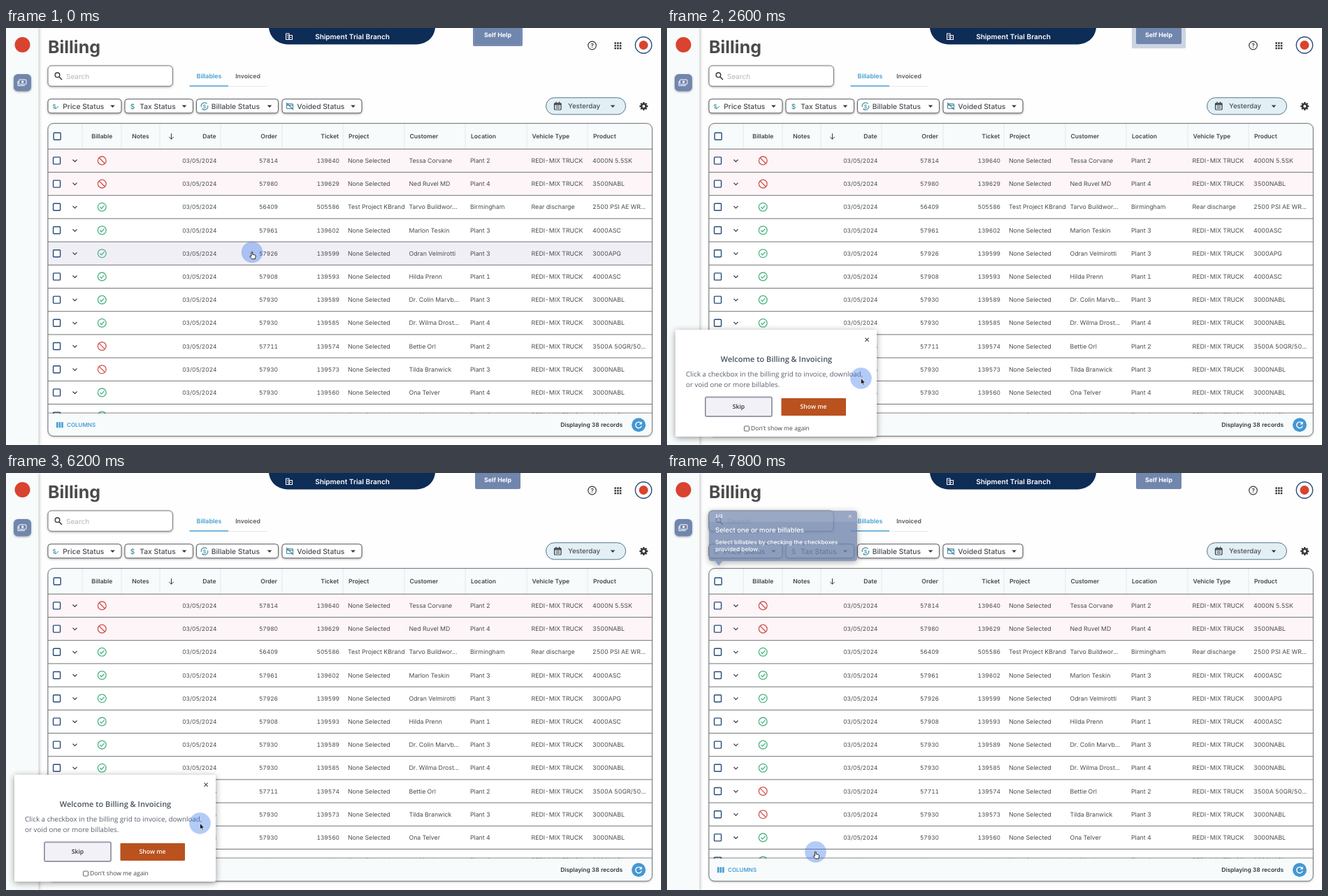
An HTML page for the animation above (8000 ms loop, 937x597 px).

```html
<!DOCTYPE html>
<html lang="en">
<head>
<meta charset="utf-8">
<title>Billing</title>
<style>
  html, body { margin: 0; width: 100%; height: 100%; overflow: hidden; background: #fefefe; }
  svg { display: block; }
  text { font-family: Inter, sans-serif; font-variant-numeric: tabular-nums; text-rendering: geometricPrecision; white-space: pre; }
  .dialog text { font-family: "Open Sans", sans-serif; }
  .shadow { filter: drop-shadow(0 1px 1.5px #0005); }
  .deep { filter: drop-shadow(0 2px 5px #0006); }
</style>
</head>
<body>
<script>
const INK = '#34383d', NAVY = '#274a78', BLUE = '#459fd3', SLATE = '#7186ad', RED = '#d9432f', RULE = '#717478';

const text = (x, y, size, str, fill = INK, weight = 400, anchor = 'start') =>
  `<text x="${x}" y="${y + size * .36}" font-size="${size}" fill="${fill}" font-weight="${weight}" text-anchor="${anchor}">${str}</text>`;
const rect = (x, y, w, h, fill, r = 0, extra = '') =>
  `<rect x="${x}" y="${y}" width="${w}" height="${h}" rx="${r}" fill="${fill}" ${extra}/>`;
const circle = (x, y, r, fill, extra = '') => `<circle cx="${x}" cy="${y}" r="${r}" fill="${fill}" ${extra}/>`;
const line = (d, stroke = INK, width = 1.2, extra = '') =>
  `<path d="${d}" fill="none" stroke="${stroke}" stroke-width="${width}" ${extra}/>`;
const fill = (d, color, extra = '') => `<path d="${d}" fill="${color}" ${extra}/>`;
const group = (content, attrs) => `<g ${attrs}>${content}</g>`;
const caret = (x, y) => fill(`M${x - 3.3} ${y - 1.6}h6.6l-3.3 3.5z`, INK);
const checkbox = (x, y) => rect(x - 5, y - 5, 10, 10, '#fff', 1, `stroke="${NAVY}" stroke-width="1.4"`);

// Side bar and top bar
function chrome() {
  let dots = '';
  for (let i = 0; i < 9; i++) dots += rect(870.4 + i % 3 * 3.7, 20.4 + (i / 3 | 0) * 3.7, 2.5, 2.5, INK);
  return rect(0, 0, 46.5, 597, '#f8fbfc', 0, 'style="filter:drop-shadow(1px 0 2px #0004)"') +
    circle(23.5, 24, 11, RED) +
    rect(11, 66, 25, 24.5, SLATE, 6, 'class="shadow"') +
    rect(18.5, 74, 10.5, 6.5, 'none', 1, 'stroke="#fff"') + circle(23.7, 77.2, 1.6, '#fff') +
    line('M17 76v6.5h10', '#fff', 1) +
    text(60, 27, 25, 'Billing', '#4b4b4d', 700) +
    fill('M376 0C378 15 389 23.6 406 23.6H584C601 23.6 612 15 614 0Z', '#0d2c56') +
    rect(400.5, 8, 4.5, 8.5, 'none', 0, 'stroke="#fff"') + rect(405, 10.5, 4.5, 6, 'none', 0, 'stroke="#fff"') +
    line('M402 10.5h1.5M402 13h1.5M406.5 13.5h1.5', '#fff', 1) +
    text(495.5, 12, 10, 'Shipment Trial Branch', '#fff', 600, 'middle') +
    rect(671, -5, 65, 28, SLATE, 2, 'id="pulse"') +
    rect(671, -5, 65, 28, SLATE, 2) +
    text(703.5, 10.3, 8.8, 'Self Help', '#fff', 700, 'middle') +
    circle(838.5, 25, 5.8, 'none', `stroke="${INK}" stroke-width="1.2"`) +
    text(838.5, 25, 8.5, '?', INK, 600, 'middle') + dots +
    circle(912, 24.5, 11.7, '#fff', `stroke="${NAVY}" stroke-width="1.4"`) + circle(912, 24.5, 6.5, RED);
}

function filterBox(x, w, label, icon) {
  return rect(x, 101.8, w, 20, '#fff', 4, 'stroke="#5c5f64" class="shadow"') + icon +
    text(x + 21.3, 112, 10.25, label, '#484b50', 500) + caret(x + w - 12.5, 112);
}

function toolbar() {
  const dollar = (x, size) => text(x, 112, size, '$', '#3d8f9e', 500, 'middle');
  const cog = line('M912.3 106v12M906.3 112h12M908.1 107.8l8.4 8.4M916.5 107.8l-8.4 8.4', INK, 2.3);
  return rect(60, 54, 178.3, 29.3, '#fff', 5, 'stroke="#77797d" class="shadow"') +
    circle(73.5, 67.3, 3.3, 'none', `stroke="${INK}" stroke-width="1.4"`) + line('M76 70l4 4', INK, 1.6) +
    text(86, 69, 10, 'Search', '#b4b6b9') +
    text(290.5, 69, 8.9, 'Billables', BLUE, 600, 'middle') +
    text(346, 69, 8.7, 'Invoiced', '#55585d', 600, 'middle') +
    line('M318 83.5H374', '#e6e8ea', 1) + line('M262.5 83H318', BLUE, 1.4) +
    filterBox(60, 105, 'Price Status', dollar(69, 8) + line('M69 114l2 2 4-4', '#3d8f9e', 1)) +
    filterBox(170, 97.5, 'Tax Status', dollar(181, 10)) +
    filterBox(272.5, 117, 'Billable Status', dollar(284, 7) +
      line('M279.5 113a4.7 4.7 0 0 1 8-4.5M288.5 111a4.7 4.7 0 0 1-8 4.5', '#3d8f9e', 1.2)) +
    filterBox(395, 114, 'Voided Status', rect(401.5, 108.5, 9, 7, 'none', 1, 'stroke="#3d8f9e" stroke-width="1.2"') +
      line('M401 107l10 10M402 110.5h9', '#3d7f9e', 1.1)) +
    rect(772.5, 99.8, 114, 24, '#e2f0f6', 12, 'stroke="#547489"') +
    rect(784.5, 107.5, 9.5, 9.5, 'none', 1, `stroke="${INK}" stroke-width="1.2"`) +
    line('M784 109.3h10', INK, 2) + line('M787 105.5v2M791.5 105.5v2M786.5 112h5.5M786.5 114.5h5.5', INK, 1) +
    text(804, 112, 9.7, 'Yesterday', '#4a5056', 500) + caret(868, 112) +
    cog + circle(912.3, 112, 4.5, INK) + circle(912.3, 112, 1.9, '#fff');
}

// status | order | ticket | project | customer | location | vehicle | product
const ROWS = `n|57814|139640||Tessa Corvane|Plant 2||4000N 5.5SK
n|57980|139629||Ned Ruvel MD|Plant 4||3500NABL
y|56409|505586|Test Project KBrandel|Tarvo Buildwor...|Birmingham|Rear discharge|2500 PSI AE WR...
y|57961|139602||Marlon Teskin|Plant 3||4000ASC
y|57926|139599||Odran Velmirotti|Plant 3||3000APG
y|57908|139593||Hilda Prenn|Plant 1||4000ASC
y|57930|139589||Dr. Colin Marvb...|Plant 3||3000NABL
y|57930|139585||Dr. Wilma Drost...|Plant 4||3000NABL
n|57711|139574||Bettie Orl|Plant 2||3500A 50GR/50...
n|57930|139573||Tilda Branwick|Plant 3||3000NABL
y|57930|139560||Ona Telver|Plant 4||3000NABL
y|57930|139558||Ivo Marden|Plant 4||3000NABL`.split('\n').map(row => row.split('|'));
const TOP = 173.3, PITCH = 33.2;

function statusIcon(ok, y) {
  const color = ok ? '#4cb482' : '#d05552';
  return circle(137.3, y, 5.9, 'none', `stroke="${color}" stroke-width="1.3"`) +
    line(ok ? `M134.4 ${y}l2.1 2.2 4-4.2` : `M133.2 ${y - 4.1}l8.2 8.2`, color, 1.3);
}

function tableRow([status, order, ticket, project, customer, place, vehicle, product], i) {
  const y = TOP + PITCH * (i + .5);
  const cell = (x, str) => text(x, y, 8.75, str, '#484b50');
  const number = (x, str) => text(x, y, 8.35, str, '#484b50', 400, 'end');
  return checkbox(72.6, y) + line(`M95.5 ${y - 1.4}l3 3 3-3`, INK, 1.2) + statusIcon(status === 'y', y) +
    number(301.5, '03/05/2024') + number(389, order) + number(477, ticket) +
    group(cell(489, project || 'None Selected'), 'clip-path="url(#project)"') + cell(576.5, customer) +
    cell(664, place) + cell(751.5, vehicle || 'REDI-MIX TRUCK') + cell(839, product) +
    line(`M60 ${y + PITCH / 2}H924`, RULE, 1);
}

function table() {
  const head = (x, str, anchor) => text(x, 155, 8.6, str, '#44474c', 600, anchor);
  const dividers = [109, 165, 220, 307, 395, 482, 570, 657, 745, 832].map(x => `M${x} 137V173`).join('');
  const body = rect(60, 136, 865, 37, '#f7fbfc') + line(dividers, '#e3e8eb', 1) +
    rect(60, TOP, 865, PITCH * 2, '#fdf5f7') + rect(60, 0, 865, PITCH, '#f1eff6', 0, 'id="hover"') +
    line(`M60 ${TOP}H925`, RULE, 1) + checkbox(73.2, 155) +
    head(137.3, 'Billable', 'middle') + head(192.5, 'Notes', 'middle') +
    line('M236.5 151v8M233.3 156l3.2 3.2 3.2-3.2', INK, 1) +
    head(300.5, 'Date', 'end') + head(388, 'Order', 'end') + head(476, 'Ticket', 'end') +
    head(490, 'Project') + head(577.5, 'Customer') + head(665, 'Location') +
    head(752.5, 'Vehicle Type') + head(840, 'Product') + ROWS.map(tableRow).join('') +
    rect(60, 552, 865, 33, '#f8fbfc', 0, 'style="filter:drop-shadow(0 -1px 1px #0007)"') +
    fill('M72 564.3h2.6v8h-2.6zM75.6 564.3h2.6v8h-2.6zM79.2 564.3h2.6v8h-2.6z', BLUE) +
    text(87, 568.3, 8, 'COLUMNS', BLUE, 600) +
    text(882, 568.3, 8.4, 'Displaying 38 records', INK, 600, 'end');
  return rect(60, 136.6, 864.3, 447.7, '#fff', 8, 'class="shadow"') + group(body, 'clip-path="url(#frame)"') +
    rect(60, 136.6, 864.3, 447.7, 'none', 8, `stroke="${RULE}"`) +
    circle(905, 568.3, 10, '#4497d3') +
    line('M908.6 566a4.3 4.3 0 1 0 .6 3.6', '#fff', 1.4) + fill('M909.7 563.2v4.2h-4.2z', '#fff');
}

function dialog() {
  const gray = '#59626e';
  return rect(12, 432, 288, 153, '#fff', 2, 'class="deep"') +
    line('M283.5 443.7l5.2 5.2M288.7 443.7l-5.2 5.2', '#444', 1.1) +
    text(156.5, 473.6, 11, 'Welcome to Billing &amp; Invoicing', '#4b535f', 600, 'middle') +
    text(27, 495.5, 9.85, 'Click a checkbox in the billing grid to invoice, download,', gray) +
    text(27, 510, 9.85, 'or void one or more billables.', gray) +
    rect(56.5, 530, 92, 25, '#f2f1f8', 1) +
    rect(55, 528.5, 95, 27.5, 'none', 2, 'id="focus" stroke="#9a9caa" stroke-width="2"') +
    text(102.5, 542.3, 8.7, 'Skip', '#333', 600, 'middle') +
    rect(163.5, 530, 92.5, 25, '#b9521f', 1) +
    text(209.5, 542.3, 8.7, 'Show me', '#fff', 600, 'middle') +
    rect(110.5, 570, 7, 7, '#fff', 1, 'stroke="#666"') +
    text(120, 573.4, 8.6, "Don't show me again", '#444');
}

function tooltip() {
  return group(fill('M64 54H268a4 4 0 0 1 4 4V122a4 4 0 0 1-4 4H79l-5 7-5-7H64a4 4 0 0 1-4-4V58a4 4 0 0 1 4-4z', SLATE),
      'opacity=".8" class="deep"') + rect(60, 54, 212, 16, '#fff', 4, 'opacity=".1"') +
    text(69, 62, 6.5, '1/2', '#fff', 700) + line('M259.8 60l4 4M263.8 60l-4 4', '#dfe5f0', 1) +
    text(69, 81.5, 9.6, 'Select one or more billables', '#fff', 500) +
    text(69, 99, 8.3, 'Select billables by checking the checkboxes', '#fff', 500) +
    text(69, 109.5, 8.3, 'provided below.', '#fff', 500);
}

const pointer = circle(0, 0, 15.3, '#3c78eb', 'opacity=".39"') +
  fill('M0 0V8.6L2 6.8 3.4 9.8 4.7 9.2 3.4 6.4H6Z', '#111', 'id="arrow" stroke="#fff" stroke-width=".6"') +
  fill('M-1 0q1-1 1.8 0v3.2l3.4.8q1.2.4 1 1.8l-.8 3.9h-4.6l-3-3.6q.1-1.4 2.2-.3z', '#fff',
    'id="hand" stroke="#111" stroke-width=".9"');

document.body.innerHTML = `<svg width="937" height="597" viewBox="0 0 937 597">
  <clipPath id="frame">${rect(60, 136.6, 864.3, 447.7, '#000', 8)}</clipPath>
  <clipPath id="project">${rect(482, 173, 88.5, 379, '#000')}</clipPath>
  ${chrome() + toolbar() + table()}
  ${group(dialog(), 'id="dialog" class="dialog"') + group(tooltip(), 'id="tip"') + group(pointer, 'id="cursor"')}
</svg>`;

const $ = id => document.getElementById(id);
const show = (id, on) => $(id).setAttribute('display', on ? 'inline' : 'none');
const set = (id, attrs) => { for (const key in attrs) $(id).setAttribute(key, attrs[key]); };
const ease = (t, from, to) => {
  const p = Math.min(1, Math.max(0, (t - from) / (to - from)));
  return p * p * (3 - 2 * p);
};

function draw(t) {
  const toDialog = ease(t, 1500, 2500), toButton = ease(t, 6500, 7300);
  const x = 352 - 74.5 * toDialog - 65 * toButton;
  const y = 321 + 180.5 * toDialog + 41 * toButton;
  const open = t >= 600 && t < 7600;
  const overDialog = open && x < 300 && y > 432;
  const overButton = overDialog && x > 163 && x < 256 && y > 530;

  show('dialog', open);
  show('focus', t < 7400);
  show('tip', t >= 7800);
  show('arrow', overDialog && !overButton);
  show('hand', !overDialog || overButton);
  set('cursor', { transform: `translate(${x} ${y})` });
  show('hover', !overDialog && t < 7600);
  set('hover', { y: TOP + Math.floor((y - TOP) / PITCH) * PITCH });

  const p = t % 1600 / 1600, spread = 3 + 5 * p;
  show('pulse', t < 4800);
  set('pulse', { x: 671 - spread, width: 65 + 2 * spread, height: 28 + spread, opacity: .95 * (1 - p) });
}

const start = performance.now();
(function tick() {
  draw(Math.floor((performance.now() - start) % 8000 / 200) * 200);
  requestAnimationFrame(tick);
})();
</script>
</body>
</html>
```
